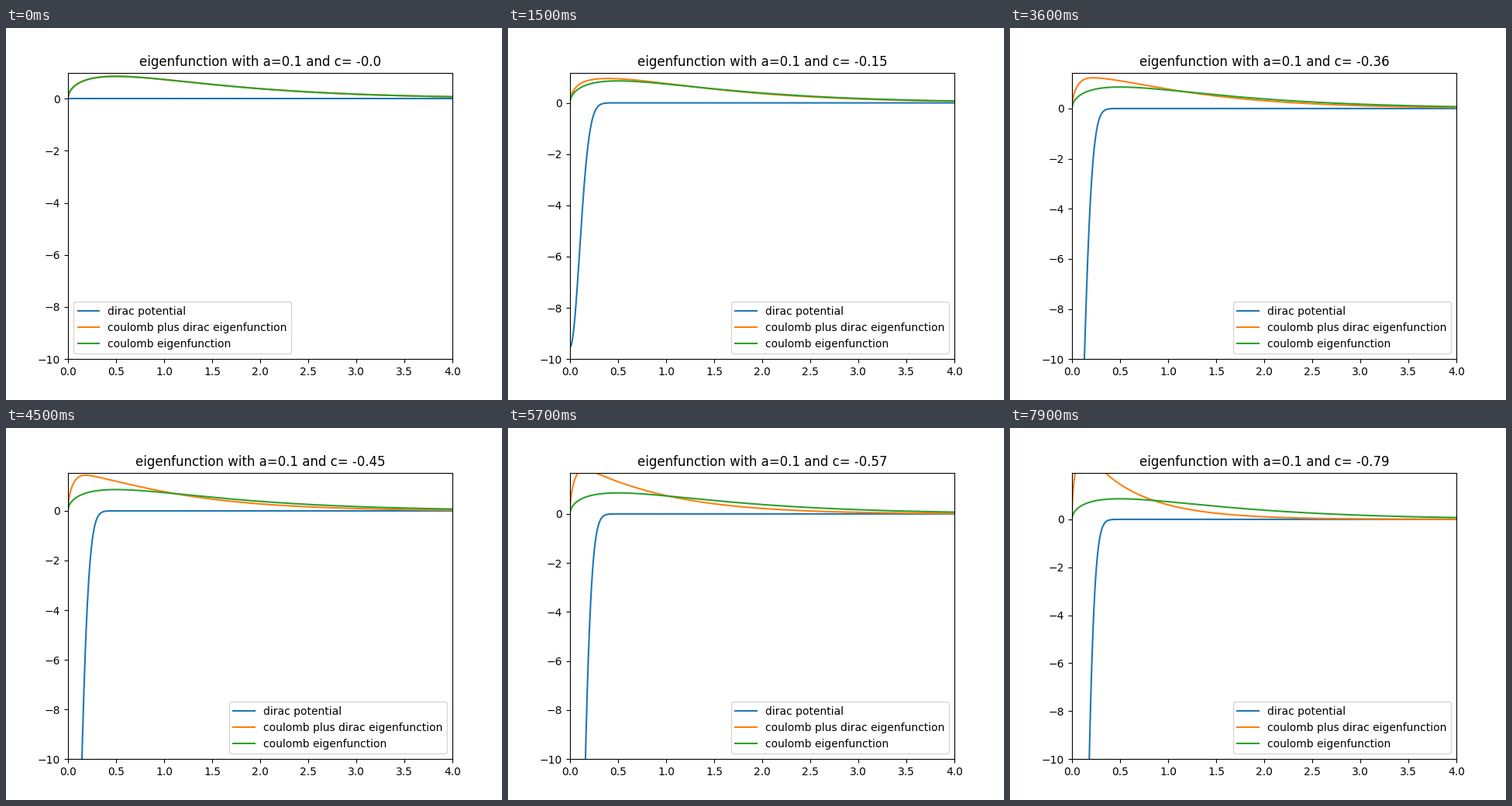
These frames come from a looping animation (640 px wide and 480 px high, 8000 ms). A matplotlib script:

```python
import numpy as np
import matplotlib.pyplot as plt
from matplotlib.animation import FuncAnimation

FRAMES = 80
WIDTH = 0.1   # width of the smeared delta
DX = 0.02     # step of the logarithmic mesh

x = np.arange(-8.0, 3.2, DX)
r = np.exp(x)
weight = r**2


def delta_well(c):
    """Normalised 3D Gaussian of strength c."""
    return c * np.exp(-r**2 / (2 * WIDTH**2)) / ((2 * np.pi)**1.5 * WIDTH**3)


# Radial equation for y = sqrt(r) R(r), with r = exp(x)
kinetic = (np.diag(np.full(x.size, 1 / DX**2 + 1 / 8))
           - (np.eye(x.size, k=1) + np.eye(x.size, k=-1)) / (2 * DX**2))
kinetic[0, 0] -= np.exp(-DX / 2) / (2 * DX**2)  # y ~ sqrt(r) at the origin


def normalise(y):
    return y / np.sqrt(np.sum(weight * y**2) * DX)


def ground_state(c, guess, steps=3):
    """Refine a nearby state by Rayleigh quotient iteration."""
    h = kinetic + np.diag(weight * (delta_well(c) - 1 / r))
    y = normalise(guess)
    for _ in range(steps):
        energy = DX * (y @ h @ y)
        shifted = h - np.diag(weight * (energy - 1e-9))
        y = normalise(np.linalg.solve(shifted, weight * y))
    return y * np.sign(y.sum())


strengths = [-(k / 100) for k in range(FRAMES)]
coulomb = 2 * np.sqrt(r) * np.exp(-r)
states = []
for c in strengths:
    states.append(ground_state(c, states[-1] if states else coulomb))

fig, ax = plt.subplots(figsize=(6.4, 4.8), dpi=100)
well_line, = ax.plot(r, delta_well(0), label="dirac potential")
state_line, = ax.plot(r, states[0], label="coulomb plus dirac eigenfunction")
ax.plot(r, coulomb, label="coulomb eigenfunction")
ax.set_xlim(0, 4)
ax.legend(loc="best")


def update(k):
    c = strengths[k]
    well_line.set_ydata(delta_well(c))
    state_line.set_ydata(states[k])
    ax.set_ylim(-10, 1 - 1.2 * c)
    ax.set_title(f"eigenfunction with a={WIDTH} and c= {c}")
    return well_line, state_line


anim = FuncAnimation(fig, update, frames=FRAMES, interval=100,
                     repeat=True, repeat_delay=0)
plt.show()
```
